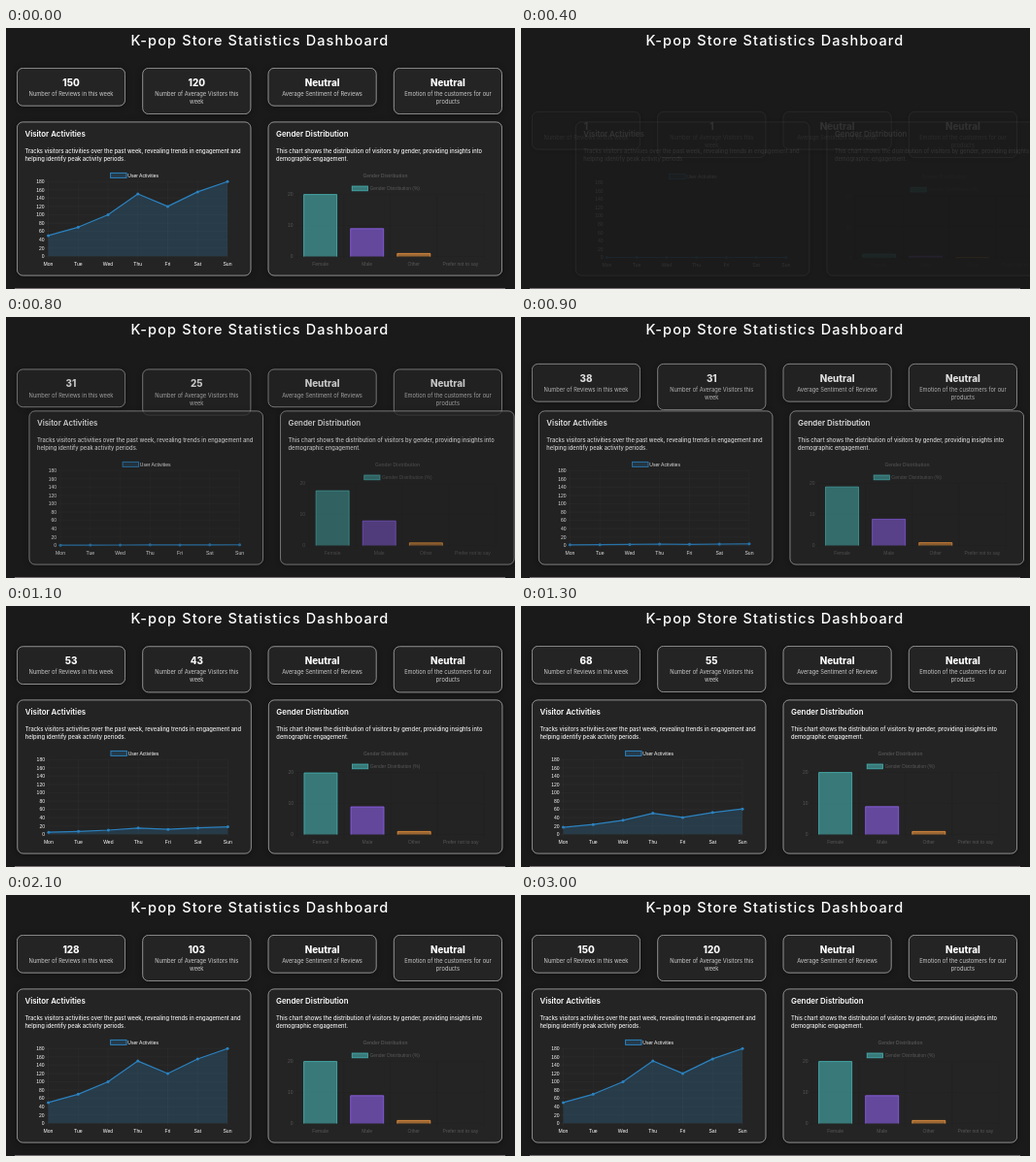
Write an HTML page that moves like this. It is 524 px wide and 269 px high and loops after 3.1 s.

```html
<!DOCTYPE html>
<html lang="en">
<head>
<meta charset="utf-8">
<title>Dashboard</title>
<style>
  html, body { margin: 0; width: 100%; height: 100%; overflow: hidden; background: #1a1a1a; }
  svg { display: block; width: 524px; height: 269px; }
  text { font-family: Inter, "Open Sans", sans-serif; }
  .chart text { font-family: "Liberation Sans", Arial, sans-serif; }
  .box { filter: drop-shadow(0 1.5px 3px rgba(0, 0, 0, .35)); }
</style>
</head>
<body>
<svg id="stage" viewBox="0 0 524 269"></svg>
<script>
const LOOP = 3100, STEP = 100;
const stage = document.getElementById('stage');

function add(parent, tag, attrs = {}, content) {
  const el = document.createElementNS('http://www.w3.org/2000/svg', tag);
  for (const k in attrs) el.setAttribute(k, attrs[k]);
  if (content !== undefined) el.textContent = content;
  parent.append(el);
  return el;
}

// y is the visual middle of the capitals
function label(parent, str, x, y, size, attrs = {}) {
  return add(parent, 'text', { x, y: y + size * 0.36, 'font-size': size, fill: '#fff', ...attrs }, str);
}

const MID = { 'text-anchor': 'middle' };
const END = { 'text-anchor': 'end' };

function box(parent, x, y, w, h) {
  add(parent, 'rect', {
    class: 'box', x, y, width: w, height: h, rx: 6,
    fill: '#242424', stroke: '#b0b0b0', 'stroke-width': 0.8
  });
}

// Page frame
add(stage, 'rect', { width: 524, height: 269, fill: '#1a1a1a' });
label(stage, 'K-pop Store Statistics Dashboard', 261.5, 13, 14.5,
  { ...MID, 'font-weight': 500, 'letter-spacing': 1.13 });
add(stage, 'rect', { x: 9, y: 268, width: 505, height: 1, fill: '#777074' });

// Stat cards
const cards = add(stage, 'g');
const stats = [
  ['150', 'Number of Reviews in this week'],
  ['120', 'Number of Average Visitors this', 'week'],
  ['Neutral', 'Average Sentiment of Reviews'],
  ['Neutral', 'Emotion of the customers for our', 'products']
];
const values = stats.map(([value, ...lines], i) => {
  const x = 11.4 + i * 129.3, cx = x + 55.6;
  box(cards, x, 41.4, 111.2, lines.length > 1 ? 47.2 : 38.8);
  lines.forEach((s, n) => label(cards, s, cx, 68 + n * 8, 5.75, { ...MID, fill: '#cdcdcd' }));
  return label(cards, value, cx, 56.4, 9.8, { ...MID, 'font-weight': 800 });
});

// Panels
const panels = add(stage, 'g');
function panel(x, title, lines) {
  box(panels, x, 96.9, 240.6, 158.2);
  label(panels, title, x + 8, 109.6, 7.9, { 'font-weight': 600 });
  lines.forEach((s, n) => label(panels, s, x + 8, 126.6 + n * 8, 5.77, { fill: '#f2f2f2', 'font-weight': 500 }));
  return add(panels, 'g', { class: 'chart' });
}

function grid(g, x1, x2, y1, y2, xs, ys, stroke) {
  const d = xs.map(x => `M${x} ${y1}V${y2 + 3}`).join('') + ys.map(y => `M${x1} ${y}H${x2}`).join('');
  add(g, 'path', { d, stroke, 'stroke-width': 0.5 });
}

// Line chart
const visits = [50, 70, 100, 150, 120, 155, 180];
const days = ['Mon', 'Tue', 'Wed', 'Thu', 'Fri', 'Sat', 'Sun'];
const dayX = i => 43.5 + i * 30.75;
const visitY = v => 235.3 - v * 0.4283;
const BLUE = '#2b82c0', BLUE_FILL = 'rgba(54,162,235,.18)';

const lineChart = panel(11.4, 'Visitor Activities', [
  'Tracks visitors activities over the past week, revealing trends in engagement and',
  'helping identify peak activity periods.'
]);
const ticks = Array.from({ length: 10 }, (_, i) => i * 20);
grid(lineChart, 40.5, 228, 158.2, 235.3, days.map((_, i) => dayX(i)), ticks.map(visitY), 'rgba(255,255,255,.05)');
ticks.forEach(v => label(lineChart, v, 39.6, visitY(v), 5, END));
days.forEach((s, i) => label(lineChart, s, dayX(i), 242.8, 5.1, MID));
add(lineChart, 'rect', { x: 107.6, y: 149.4, width: 16.4, height: 5, fill: BLUE_FILL, stroke: BLUE });
label(lineChart, 'User Activities', 125.3, 152, 5.05);
const area = add(lineChart, 'path', { fill: BLUE_FILL });
const line = add(lineChart, 'path', { fill: 'none', stroke: BLUE, 'stroke-width': 1.2, 'stroke-linejoin': 'round' });
const dots = visits.map((_, i) => add(lineChart, 'circle', { cx: dayX(i), r: 1.5, fill: BLUE }));

// Bar chart
const barChart = panel(270, 'Gender Distribution', [
  'This chart shows the distribution of visitors by gender, providing insights into',
  'demographic engagement.'
]);
const BASE = 235.6, UNIT = 3.2, GREY = '#575757';
const groups = [
  ['Female', 20, '75,192,192'],
  ['Male', 9, '153,102,255'],
  ['Other', 1, '255,159,64'],
  ['Prefer not to say', 0, '255,99,132']
];
const tint = (rgb, a) => `rgba(${rgb},${a})`;
grid(barChart, 297, 492, 171.6, BASE, [299.5, 347.6, 395.7, 443.8, 492], [171.6, 203.6, BASE], 'rgba(0,0,0,.1)');
label(barChart, 'Gender Distribution', 390.5, 152.4, 4.9, { ...MID, 'font-weight': 700, fill: '#505050' });
add(barChart, 'rect', {
  x: 356.2, y: 163, width: 16.2, height: 4.8,
  fill: tint(groups[0][2], 0.55), stroke: tint(groups[0][2], 0.85), 'stroke-width': 0.8
});
label(barChart, 'Gender Distribution (%)', 374.4, 165.5, 4.95, { fill: GREY });
[0, 10, 20].forEach(v => label(barChart, v, 295.6, BASE - v * UNIT, 5, { ...END, fill: GREY }));
const bars = groups.map(([name, value, rgb], i) => {
  const cx = 323.6 + i * 48.1;
  label(barChart, name, cx, 242.8, 5, { ...MID, fill: GREY });
  return {
    x: cx - 17, value,
    fill: add(barChart, 'path', { fill: tint(rgb, 0.55) }),
    edge: add(barChart, 'path', { fill: 'none', stroke: tint(rgb, 0.9), 'stroke-width': 0.8 })
  };
});

// Timing
const span = (t, start, length) => Math.min(1, Math.max(0, (t - start) / length));
const outQuart = x => 1 - (1 - x) ** 4;
const inOutQuint = x => x < 0.5 ? 16 * x ** 5 : 1 - 16 * (1 - x) ** 5;

// cubic-bezier(0, 0, .58, 1)
function easeOut(x) {
  let lo = 0, hi = 1;
  for (let i = 0; i < 20; i++) {
    const s = (lo + hi) / 2;
    if (1.74 * s * s * (1 - s) + s ** 3 < x) lo = s; else hi = s;
  }
  return lo * lo * (3 - 2 * lo);
}

function draw(time) {
  // The finished page shows briefly before it reloads
  const t = time < STEP ? LOOP : time;

  const p = easeOut(span(t, 350, 800)), shift = 50 * (1 - p);
  cards.setAttribute('transform', `translate(0 ${shift})`);
  panels.setAttribute('transform', `translate(${shift} 0)`);
  cards.setAttribute('opacity', p);
  panels.setAttribute('opacity', p);

  const settle = t < 800 ? 1.2 : 0;
  for (const c of [lineChart, barChart]) c.setAttribute('transform', `translate(0 ${settle})`);

  const count = span(t, 390, 2000);
  values[0].textContent = Math.round(150 * count);
  values[1].textContent = Math.round(120 * count);

  const rise = inOutQuint(span(t, 375, 2000));
  const ys = visits.map(v => visitY(v * rise));
  const d = 'M' + ys.map((y, i) => `${dayX(i)} ${y}`).join('L');
  line.setAttribute('d', d);
  area.setAttribute('d', `${d}V${visitY(0)}H${dayX(0)}Z`);
  dots.forEach((dot, i) => dot.setAttribute('cy', ys[i]));

  const grow = outQuart(span(t, 385, 1000));
  for (const b of bars) {
    const top = BASE - b.value * UNIT * grow;
    const path = b.value ? `M${b.x} ${BASE}V${top}h34V${BASE}` : '';
    b.fill.setAttribute('d', path);
    b.edge.setAttribute('d', path);
  }
}

const begin = performance.now();
function tick() {
  const t = (performance.now() - begin) % LOOP;
  draw(Math.floor(t / STEP) * STEP);
  requestAnimationFrame(tick);
}
tick();
</script>
</body>
</html>
```
